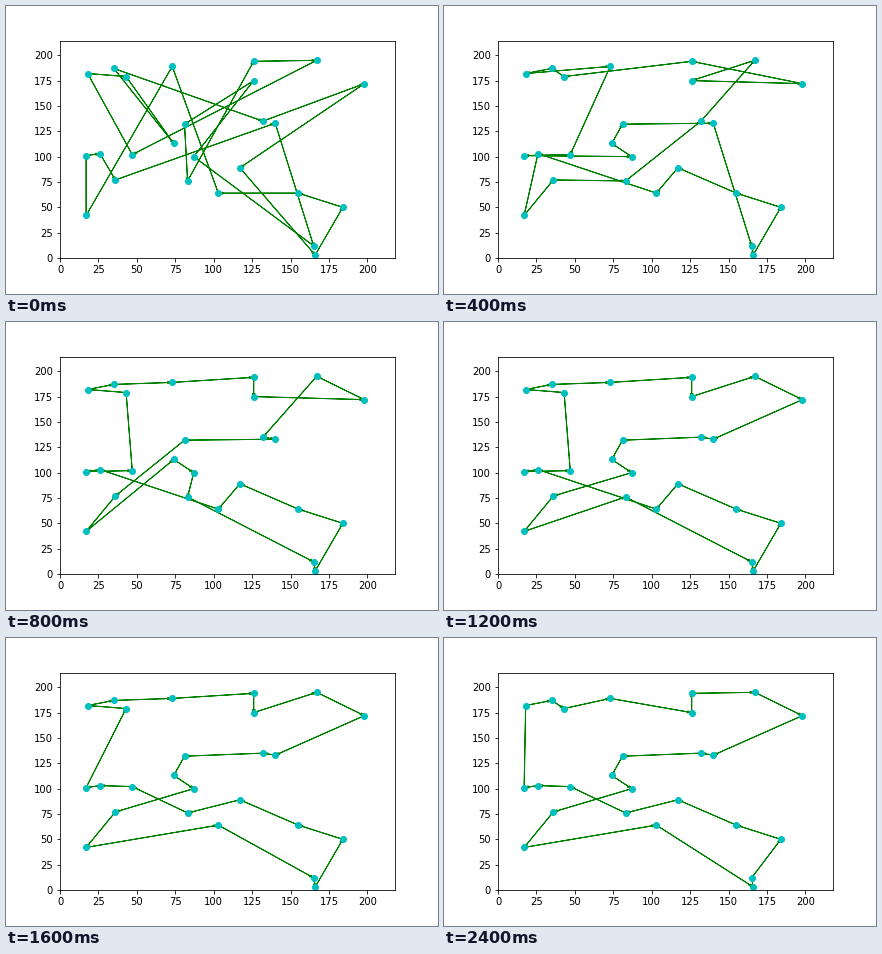
A matplotlib script that plays this animation: 432 by 288 pixels, repeating every 8 s.

```python
import matplotlib.pyplot as plt
from matplotlib.animation import FuncAnimation

STEP = 200      # ms per frame
FRAMES = 40

CITIES = {
    "A": (18, 182), "B": (43, 179), "C": (35, 187), "D": (73, 189),
    "E": (126, 194), "F": (126, 175), "G": (167, 195), "H": (198, 172),
    "I": (132, 135), "J": (140, 133), "K": (81, 132), "L": (74, 113),
    "M": (87, 100), "N": (47, 102), "O": (26, 103), "P": (17, 101),
    "Q": (36, 77), "R": (17, 42), "S": (83, 76), "T": (103, 64),
    "U": (117, 89), "V": (155, 64), "W": (184, 50), "X": (165, 12),
    "Y": (166, 3),
}

# Closed tours found by the search, one per step; the last one stays.
TOURS = [
    "ABLCIHUYWVTDRPOQJXMFKSEGN",
    "ADNPORQJKLMXYWVUTSIHFGEBC",
    "ADNPMLKJXYWVUTORQSIGFHEBC",
    "ACDEFHGIJKYXSQRLMWVUTOPNB",
    "ACDEFHGIJKQRLMSXYWVUTOPNB",
    "ACDEFHGIJKLMQRSXYWVUTOPNB",
    "ACDEFGHJIKLMQRSXYWVUTOPNB",
    "ACDEFGHJIKLMQRTYXWVUSOPNB",
    "ACDEFGHJIKLMQRTXYWVUSNOPB",
    "ACBDFEGHJIKLMQRTXYWVUSNPO",
    "ACBDFEGHJIKLMQRTYXWVUSNPO",
    "ACBDFEGHJIKLMQRTYXWVUSNPO",
    "ACBDFEGHJIKLMQRTYXWVUSNOP",
]

xs, ys = zip(*CITIES.values())

fig = plt.figure(figsize=(6, 4), dpi=72, facecolor="white")
fig.subplots_adjust(left=0.125, right=0.9, bottom=0.125, top=0.88)
ax = fig.add_subplot()
ax.plot(xs, ys, "co")
ax.set_xlim(0, max(xs) * 1.1)
ax.set_ylim(0, max(ys) * 1.1)
ax.set_xticks(range(0, 201, 25))
ax.set_yticks(range(0, 201, 25))

arrows = []


def draw(i):
    while arrows:
        arrows.pop().remove()
    tour = TOURS[min(i, len(TOURS) - 1)]
    for a, b in zip(tour, tour[1:] + tour[0]):
        (x0, y0), (x1, y1) = CITIES[a], CITIES[b]
        arrows.append(ax.arrow(x0, y0, x1 - x0, y1 - y0, color="g",
                               head_width=max(xs) / 100,
                               length_includes_head=True))
    return arrows


anim = FuncAnimation(fig, draw, frames=FRAMES, init_func=lambda: draw(0),
                     interval=STEP, repeat=True, repeat_delay=0)
plt.show()
```
